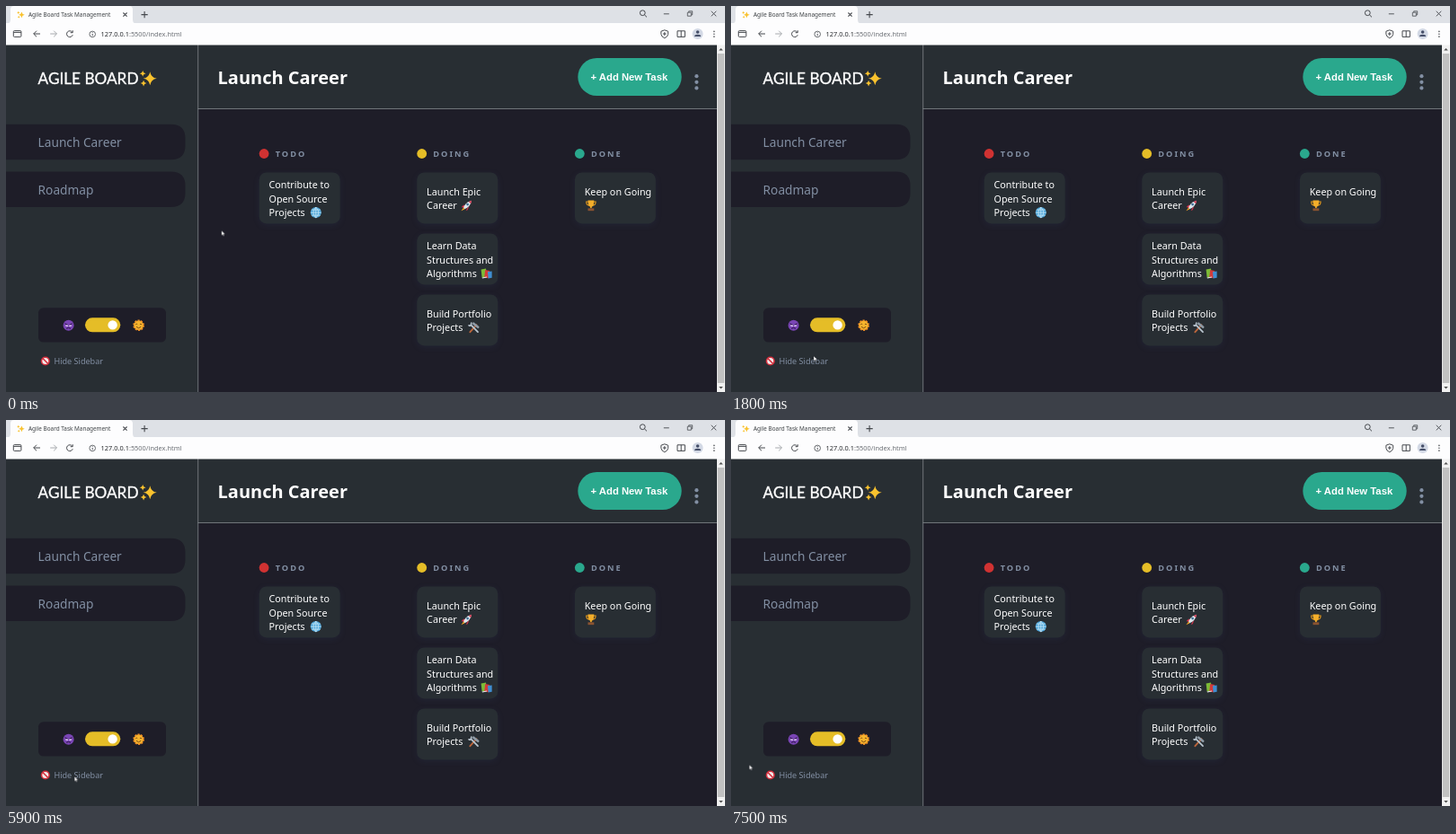
An HTML page for the animation above (8000 ms loop, 800x430 px).

```html
<!DOCTYPE html>
<html lang="en">
<head>
<meta charset="utf-8">
<title>Agile Board Task Management</title>
<style>
  html, body { margin: 0; width: 100%; height: 100%; overflow: hidden; background: #1e1d28; }
  svg { display: block; width: 800px; height: 430px; }
  text { font-family: "Noto Sans", "Open Sans", sans-serif; white-space: pre; }
  .title { font-size: 20px; font-weight: 700; fill: #fff; }
  .logo { font-family: Lato, sans-serif; font-size: 17.2px; fill: #fff; stroke: #fff; stroke-width: .35px; }
  .nav { font-size: 13.7px; font-weight: 500; fill: #828fa3; }
  .head { font-size: 9.2px; font-weight: 600; letter-spacing: 2px; fill: #828fa3; }
  .task { font-size: 10.76px; fill: #fff; }
  .hide { font-size: 9.1px; fill: #828fa3; }
  .add { font-family: "Liberation Sans", Arial, sans-serif; font-size: 11.3px; font-weight: 700; fill: #fff; }
  .tab { font-size: 6.4px; fill: #3c4043; }
  .url { font-size: 7.4px; fill: #6b6f74; }
  .card { fill: #282e33; filter: drop-shadow(0 2px 3px rgba(54, 78, 126, .13)); }
  .icon { fill: none; stroke: #45484d; stroke-width: 1; }
</style>
</head>
<body>
<svg viewBox="0 0 800 430" xmlns="http://www.w3.org/2000/svg">
  <defs>
    <path id="star" d="M0-6Q.8-.8 6 0Q.8.8 0 6Q-.8.8-6 0Q-.8-.8 0-6Z"/>
    <g id="sparkles" fill="#f9c22e">
      <use href="#star" x="1.8" y=".2" transform="scale(1.12)"/>
      <use href="#star" transform="translate(-5.2 -4.6) scale(.52)"/>
      <use href="#star" transform="translate(-4.4 5) scale(.5)"/>
    </g>
    <g id="globe">
      <circle r="6" fill="#4aa3d8"/>
      <path d="M-6 0H6M0-6V6M-5-3H5M-5 3H5M0-6Q-6 0 0 6Q6 0 0-6" fill="none" stroke="#c9e9f8" stroke-width=".8"/>
    </g>
    <g id="rocket">
      <path d="M-2.5-.8L-5.3.8L-4.6 2.4L-1 1.4ZM1 2.6L-.6 5.6L1.2 5L3 1Z" fill="#d8314b"/>
      <path d="M-3.4 3Q-2.5-2.8 5.6-5.6Q4.4 1.6-2.4 4Z" fill="#dfe6ec"/>
      <path d="M2.4-4.3L5.6-5.6L4.8-2Z" fill="#d8314b"/>
      <circle cx="1.2" cy="-1.3" r="1.4" fill="#3d6f96"/>
      <path d="M-3.2 2.2L-6 5.8L-2 4Z" fill="#f6a425"/>
    </g>
    <g id="books">
      <path d="M-6-4.6L-.6-5.6L.4 3.4L-5 4.4Z" fill="#7dbb37"/>
      <path d="M-1.4-4L3.6-3L2.4 5.2L-2.4 4.4Z" fill="#d23b3b"/>
      <path d="M1.4-2L6-2.6L6 4.6L2 5.4Z" fill="#3f8fd2"/>
      <path d="M-5 4.4L.4 3.4V4.4L-4.6 5.4Z" fill="#e9eef0"/>
    </g>
    <g id="tools" fill="none" stroke-linecap="round">
      <path d="M-4 4.8L3-3" stroke="#b9653c" stroke-width="2"/>
      <path d="M-.2-4.6L4.8-.6" stroke="#8f9ba6" stroke-width="2.6"/>
      <path d="M4.6 4.8L-3-3" stroke="#b7c3cd" stroke-width="1.8"/>
      <path d="M-5.4-2.6Q-3-1-2.6-5.2" stroke="#b7c3cd" stroke-width="1.6"/>
    </g>
    <g id="trophy">
      <path d="M-3-4.4H-5.2Q-5.2-.4-2-.2M3-4.4H5.2Q5.2-.4 2-.2" fill="none" stroke="#e2981b" stroke-width="1.1"/>
      <path d="M-3.4-5.8H3.4Q3.6.6.8 1.4V3H-.8V1.4Q-3.6.6-3.4-5.8Z" fill="#f4ae2a"/>
      <path d="M-3.4 3H3.4V5.8H-3.4Z" fill="#8a5331"/>
    </g>
  </defs>

  <rect width="800" height="430" fill="#1e1d28"/>
  <rect y="43" width="791" height="71.5" fill="#282e33"/>
  <path d="M0 114.5H791" stroke="#70767a"/>
  <g id="shown"></g>
  <g id="hidden"></g>

  <rect x="636.3" y="58" width="115.4" height="42" rx="21" fill="#2aa88d"/>
  <text class="add" x="650.5" y="82.9">+ Add New Task</text>
  <g fill="#828fa3">
    <circle cx="768.4" cy="78.2" r="2.1"/><circle cx="768.4" cy="84.8" r="2.1"/><circle cx="768.4" cy="91.4" r="2.1"/>
  </g>

  <!-- Scrollbar -->
  <rect x="791" y="43" width="9" height="387" fill="#f1f1f1"/>
  <rect x="791.8" y="53" width="7.4" height="367" fill="#c1c1c1"/>
  <path d="M793.2 49.6L795.5 47L797.8 49.6ZM793.2 424L795.5 426.6L797.8 424Z" fill="#505050"/>

  <!-- Browser window -->
  <rect width="800" height="20" fill="#dee1e6"/>
  <rect y="19" width="800" height="24.5" fill="#fdfdfe"/>
  <path d="M2 19.5Q5 19 5 15V4Q5 0 9 0H137Q141 0 141 4V15Q141 19 144 19.5Z" fill="#fdfdfe"/>
  <use href="#sparkles" transform="translate(16.4 9.7) scale(.5)"/>
  <text class="tab" x="25" y="12">Agile Board Task Management</text>
  <text class="url" x="105.6" y="34"><tspan fill="#25282b">127.0.0.1</tspan>:5500/index.html</text>
  <g class="icon">
    <path d="M130.4 7.5L134.6 11.7M134.6 7.5L130.4 11.7M150.5 9.6H157.7M154.1 6V13.2" stroke-width="1.1"/>
    <circle cx="708.3" cy="7.7" r="2.9"/><path d="M710.4 9.8L713 12.4"/>
    <path d="M731.8 8.8H737.8M784.7 5.8L790.3 11.4M790.3 5.8L784.7 11.4" stroke-width=".9"/>
    <path d="M758.3 7.2H762.3V11.2H758.3ZM759.7 7V5.8H763.7V9.8H762.5" stroke-width=".8"/>
    <rect x="8.3" y="27.6" width="8.6" height="6.8" rx="1"/><path d="M8.3 29.4H16.9"/>
    <path d="M38 31H30.8M34 27.7L30.7 31L34 34.3"/>
    <path d="M49.2 31H56.4M53.2 27.7L56.5 31L53.2 34.3" stroke="#a6a9ad"/>
    <path d="M73.8 29.3A3.4 3.4 0 1 0 74.2 32.2M74.2 27.2V29.7H71.7"/>
    <circle cx="96.2" cy="31.4" r="3.3" stroke-width=".8"/><path d="M96.2 31V33.2M96.2 29.3V30.1" stroke-width=".9"/>
    <path d="M732.8 26.8L736.7 28.2V31.4Q736.4 34.3 732.8 35.8Q729.2 34.3 728.9 31.4V28.2ZM730.9 31H734.7M732.8 29.1V32.9"/>
    <path d="M747 27.8H755.4V34.4H747ZM751.2 27.8V34.4"/>
  </g>
  <circle cx="769.6" cy="31" r="6" fill="#d3d9e5"/>
  <path d="M766 33.9Q766 31.7 769.6 31.7Q773.2 31.7 773.2 33.9ZM769.6 27.2A1.8 1.8 0 1 1 769.6 30.8A1.8 1.8 0 1 1 769.6 27.2Z" fill="#47506a"/>
  <path d="M787.9 28.3V28.4M787.9 31.2V31.3M787.9 34.1V34.2" stroke="#45484d" stroke-width="1.5" stroke-linecap="round"/>

  <path id="cursor" d="M0 0V5.3L1.3 4.2L2.1 6L3 5.6L2.2 3.9L3.8 3.7Z" fill="#fff" stroke="#15151c" stroke-width=".3"/>
</svg>
<script>
const LOOP = 8000;
const $ = id => document.getElementById(id);
const text = (cls, x, y, s) => `<text class="${cls}" x="${x}" y="${y}">${s}</text>`;

function card(x, y, w, lines, icon, dx) {
  const first = y + 33.1 - (lines.length - 1) * 7.75;
  const last = first + (lines.length - 1) * 15.5;
  return `<rect class="card" x="${x}" y="${y}" width="${w}" height="57" rx="8"/>` +
    lines.map((s, i) => text('task', x + 10.8, first + i * 15.5, s)).join('') +
    `<use href="#${icon}" x="${x + 10.8 + dx}" y="${last - 3.9}"/>`;
}

function column(x, w, name, color, tasks) {
  return `<circle cx="${x + 5.4}" cy="164.5" r="5.4" fill="${color}"/>` +
    text('head', x + 18, 167.9, name) +
    tasks.map((t, i) => card(x, 185.4 + i * 68, w, ...t)).join('');
}

function board(x, step, w, [open, epic, learn, build, keep]) {
  return column(x, w, 'TODO', '#d03232', [open]) +
    column(x + step, w, 'DOING', '#e5bd27', [epic, learn, build]) +
    column(x + 2 * step, w, 'DONE', '#2aa88d', [keep]);
}

const navItem = (y, label) =>
  `<path d="M0 ${y}h183.5q16 0 16 16v7.5q0 16-16 16H0Z" fill="#1e1d28"/>` + text('nav', 35.6, y + 25, label);

const sidebar = `
  <rect y="43" width="213" height="387" fill="#282e33"/>
  <path d="M213.7 43V430" stroke="#70767a"/>
  ${text('logo', 35.6, 86.6, 'AGILE BOARD')}
  <use href="#sparkles" transform="translate(158 80.5) scale(1.12)"/>
  ${navItem(131.8, 'Launch Career')}${navItem(184.5, 'Roadmap')}
  <rect x="36" y="336.3" width="142" height="38.2" rx="5.5" fill="#1e1d28"/>
  <rect x="88" y="347.3" width="39.3" height="16" rx="8" fill="#e5bd27"/>
  <circle cx="118.6" cy="355.4" r="5.2" fill="#fff"/>
  <circle cx="69.6" cy="355.7" r="6" fill="#7a45b5"/>
  <path d="M65.5 353.8L68.8 355.4M73.7 353.8L70.4 355.4M67.2 359.4Q69.6 357.8 72 359.4" fill="none" stroke="#281541" stroke-width="1"/>
  <path d="M66 355.6H69V357H66.6ZM70.2 355.6H73.2L72.6 357H70.2Z" fill="#dcc9f0"/>
  <circle cx="147.6" cy="355.7" r="5.4" fill="#f6b52d" stroke="#ef8e25" stroke-width="1.8" stroke-dasharray="2 1.4"/>
  <path d="M144.3 354.8q1-1.4 2 0M148.9 354.8q1-1.4 2 0M145 357.3q2.6 3 5.2 0" fill="none" stroke="#6e3d14" stroke-width=".9"/>
  <circle cx="43.8" cy="395.5" r="4.3" fill="#f4e9ea" stroke="#d32f3d" stroke-width="1.6"/>
  <path d="M40.8 392.5L46.8 398.5" stroke="#d32f3d" stroke-width="1.6"/>
  ${text('hide', 53.4, 398.7, 'Hide Sidebar')}`;

const eyes = `
  <path d="M0 369.5H21.5a14.5 14.5 0 0 1 0 29H0Z" fill="#2aa88d"/>
  <g fill="#fff"><ellipse cx="16.1" cy="384" rx="2.6" ry="4"/><ellipse cx="21.7" cy="384" rx="2.6" ry="4"/></g>
  <g fill="#222"><ellipse cx="15.4" cy="384.6" rx="1.3" ry="1.9"/><ellipse cx="21" cy="384.6" rx="1.3" ry="1.9"/></g>`;

$('shown').innerHTML = sidebar + text('title', 235.5, 87.4, 'Launch Career') +
  board(281.7, 175.6, 90, [
    [['Contribute to', 'Open Source', 'Projects'], 'globe', 52.3],
    [['Launch Epic', 'Career'], 'rocket', 44.3],
    [['Learn Data', 'Structures and', 'Algorithms'], 'books', 66.5],
    [['Build Portfolio', 'Projects'], 'tools', 52.3],
    [['Keep on Going', ''], 'trophy', 7.2]
  ]);

$('hidden').innerHTML = eyes + text('title', 21.6, 87.4, 'Launch Career') +
  board(67.7, 246.9, 161.6, [
    [['Contribute to Open Source', 'Projects'], 'globe', 52.3],
    [['Launch Epic Career'], 'rocket', 108.6],
    [['Learn Data Structures and', 'Algorithms'], 'books', 66.5],
    [['Build Portfolio Projects'], 'tools', 127.8],
    [['Keep on Going'], 'trophy', 84.5]
  ]);

// Each row holds its value until the next row's time.
function play(el, prop, rows) {
  const keys = rows.map(([t, v]) => ({ offset: t / LOOP, [prop]: v, easing: 'steps(1, end)' }));
  keys.push({ offset: 1, [prop]: rows[rows.length - 1][1] });
  el.animate(keys, { duration: LOOP, iterations: Infinity });
}

play($('shown'), 'visibility', [[0, 'visible'], [6000, 'hidden'], [7500, 'visible']]);
play($('hidden'), 'visibility', [[0, 'hidden'], [6000, 'visible'], [7500, 'hidden']]);

// The pointer glides in 100 ms ticks between some stops.
const glide = (start, n, [x0, y0], [x1, y1]) => Array.from({ length: n }, (_, i) => {
  const p = (i + 1) / n, e = p * p * (3 - 2 * p);
  return [start + i * 100, x0 + (x1 - x0) * e, y0 + (y1 - y0) * e];
});
const path = [
  [0, 239.8, 250.3], [900, 262, 322], [1200, 271.3, 347.3],
  ...glide(1400, 5, [271.3, 347.3], [92, 390]),
  [3400, 81.8, 395.3], [3500, 81, 390], [3900, 80.5, 389], [4000, 80, 388],
  ...glide(4400, 7, [80, 388], [82, 400]),
  [5500, 78, 399], [5900, 76.3, 397.3], [6000, 74.4, 397],
  [7000, 38, 377.4], [7500, 20.4, 384.2]
];
play($('cursor'), 'transform', path.map(([t, x, y]) => [t, `translate(${x}px, ${y}px)`]));
</script>
</body>
</html>
```
